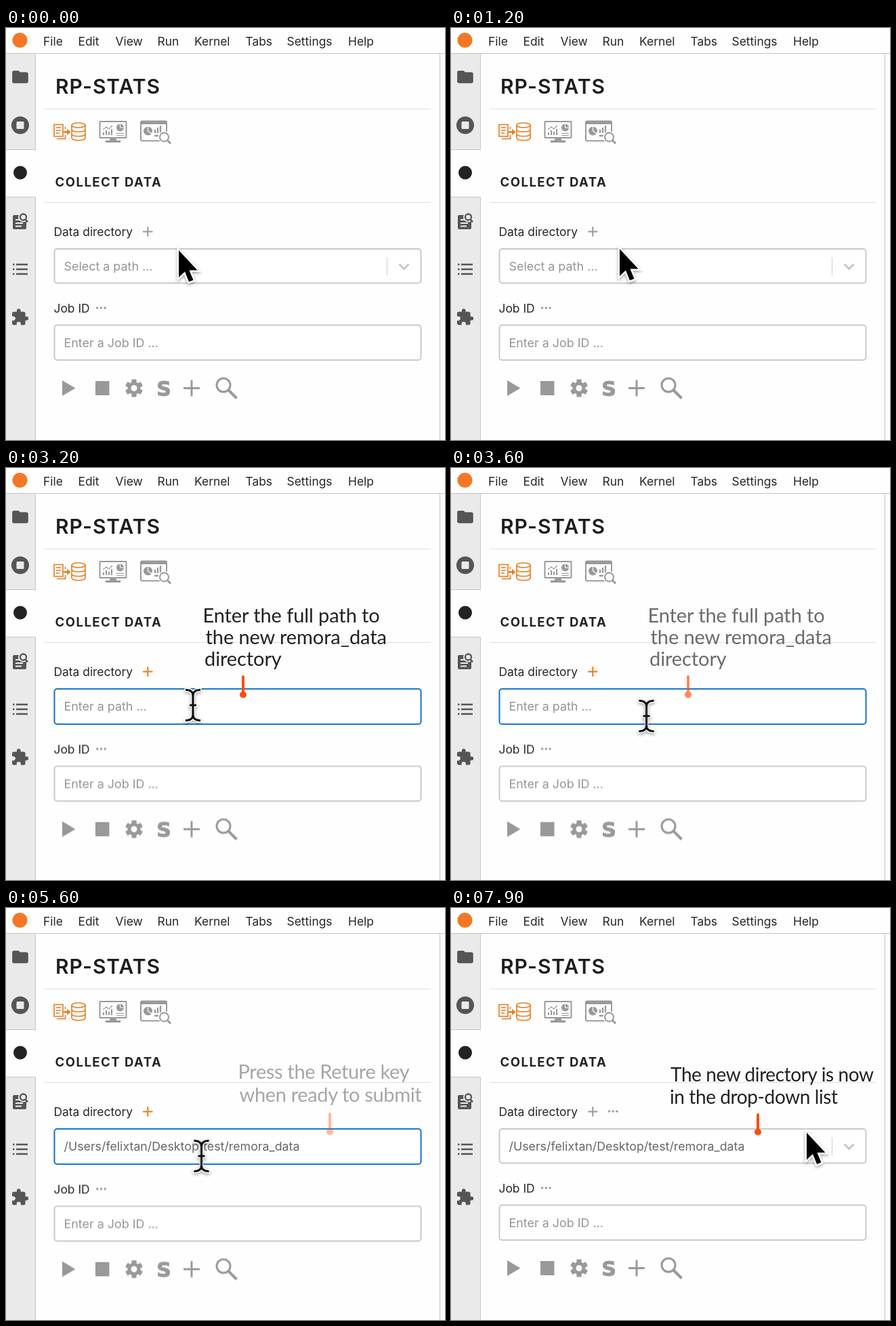
An HTML page that plays this animation: 648x608 px, repeating every 8 s.

```html
<!DOCTYPE html>
<html lang="en">
<head>
<meta charset="utf-8">
<title>Collect data</title>
<style>
html, body { margin: 0; width: 100%; height: 100%; overflow: hidden; background: #fefefe; }
svg { display: block; width: 648px; height: 608px; }
text { font-family: Inter, Roboto, sans-serif; font-optical-sizing: none; font-size: 17.4px; fill: #262626; white-space: pre; }
.hint { font-size: 17.9px; fill: #949494; }
.path { font-size: 17.8px; fill: #666; }
.note text { font: 29px Lato, "Open Sans", sans-serif; fill: #222; }
.note path { stroke: #ff4e0a; stroke-width: 4; stroke-linecap: round; }
.note circle { fill: #ff4e0a; }
.line { fill: none; stroke: #dedede; }
.edge { fill: none; stroke: #c4c4c4; }
.box { fill: #fff; stroke: #c9c9c9; stroke-width: 2; }
.dark { fill: #555; }
.gray { fill: #999; }
.stroke { fill: none; stroke: #999; stroke-width: 2; }
.orange { fill: none; stroke: #ec7a1c; stroke-width: 1.6; }

/* every part shares one 8 s clock */
.step { animation: 8s step-end infinite; }
.flow { animation: 8s linear infinite; }
.start { animation-name: start; }
.view { animation-name: view; }
.edit { animation-name: edit; }
.done { animation-name: done; }
.empty { animation-name: empty; }
.typed { animation-name: typed; }
.focus { animation-name: focus; stroke: #1976d2; }
.lower { animation-name: lower; }
.plus { animation-name: plus; fill: none; stroke: #999; stroke-width: 2; }
.arrow { animation-name: arrow; }
.hand { animation-name: hand; }
.beam { animation-name: beam; }
.note1 { animation-name: note1; letter-spacing: -.1px; }
.note2 { animation-name: note2; letter-spacing: -.35px; }
.note3 { animation-name: note3; letter-spacing: -.4px; }
.note3 text { font-size: 28px; }
.cursor { animation-name: travel; filter: drop-shadow(0 2px 2px rgba(0, 0, 0, .35)); }

@keyframes start { 0% { opacity: 1 } 23.75%, 100% { opacity: 0 } }
@keyframes view { 0% { opacity: 1 } 23.75% { opacity: 0 } 72.5%, 100% { opacity: 1 } }
@keyframes edit { 0% { opacity: 0 } 23.75% { opacity: 1 } 72.5%, 100% { opacity: 0 } }
@keyframes done { 0% { opacity: 0 } 72.5%, 100% { opacity: 1 } }
@keyframes empty { 0% { opacity: 0 } 23.75% { opacity: 1 } 47.5%, 100% { opacity: 0 } }
@keyframes typed { 0% { opacity: 0 } 47.5% { opacity: 1 } 72.5%, 100% { opacity: 0 } }
@keyframes focus { 0% { opacity: 0 } 33.75% { opacity: 1 } 72.5%, 100% { opacity: 0 } }
@keyframes lower { 0% { transform: none } 23.75% { transform: translateY(1.5px) } 72.5%, 100% { transform: none } }
@keyframes plus { 0% { stroke: #999 } 20% { stroke: #ec7a1c } 72.5%, 100% { stroke: #999 } }
@keyframes arrow { 0% { opacity: 1 } 18.75% { opacity: 0 } 72.5%, 100% { opacity: 1 } }
@keyframes hand { 0% { opacity: 0 } 18.75% { opacity: 1 } 29.375%, 100% { opacity: 0 } }
@keyframes beam { 0% { opacity: 0 } 29.375% { opacity: 1 } 72.5%, 100% { opacity: 0 } }
@keyframes note1 { 0%, 35% { opacity: 0 } 38.75%, 43.75% { opacity: 1 } 47.5%, 100% { opacity: 0 } }
@keyframes note2 { 0%, 53.75% { opacity: 0 } 58.75%, 67% { opacity: 1 } 72%, 100% { opacity: 0 } }
@keyframes note3 { 0%, 76.25% { opacity: 0 } 81.25%, 100% { opacity: 1 } }
@keyframes travel {
  0%, 11.25% { transform: translate(255px, 328px) }
  15% { transform: translate(249px, 326px) }
  20%, 23.75% { transform: translate(213px, 304px) }
  27.5% { transform: translate(235px, 317px) }
  31.25% { transform: translate(274px, 350px) }
  33.75%, 41.25% { transform: translate(276px, 350px) }
  43.75%, 73% { transform: translate(288.5px, 366px) }
  77.5%, 94.375% { transform: translate(582px, 332px) }
  98.75%, 100% { transform: translate(525px, 331.5px) }
}
</style>
</head>
<body>
<svg viewBox="0 0 648 608">
  <defs>
    <g id="dots" class="gray"><circle r="1.7"/><circle cx="5.7" r="1.7"/><circle cx="11.4" r="1.7"/></g>
    <path id="ibeam" d="M-9.5-22.5Q0-22 0-14Q0-22 9.5-22.5M0-14V14M-9.5 22.5Q0 22 0 14Q0 22 9.5 22.5M-3.5 0H3.5" fill="none" stroke-linecap="square"/>
    <rect id="tooth" x="-3.6" y="-13" width="7.2" height="26" rx="1"/>
  </defs>

  <!-- frame and menu -->
  <rect width="648" height="608" fill="#fefefe"/>
  <path d="M0 38H43V179H0ZM0 250H43V608H0Z" fill="#ebeaeb"/>
  <path class="edge" d="M0 37.5H648M43.5 38V179.5H0M0 249.5H43.5V608M640.5 38V608"/>
  <circle cx="20.5" cy="18" r="11" fill="#f37726"/>
  <g>
    <text x="55" y="25.5">File</text>
    <text x="106.5" y="25.5">Edit</text>
    <text x="161.5" y="25.5">View</text>
    <text x="223.5" y="25.5">Run</text>
    <text x="278" y="25.5">Kernel</text>
    <text x="353.5" y="25.5">Tabs</text>
    <text x="414.5" y="25.5">Settings</text>
    <text x="505" y="25.5">Help</text>
  </g>

  <!-- sidebar -->
  <path class="dark" transform="translate(6.8 58.4) scale(1.18 1.15)" d="M10 4H4c-1.1 0-2 .9-2 2v12c0 1.1.9 2 2 2h16c1.1 0 2-.9 2-2V8c0-1.1-.9-2-2-2h-8l-2-2z"/>
  <circle class="dark" cx="21" cy="143.5" r="13"/>
  <rect x="15.5" y="138" width="11" height="11" rx="1.5" fill="#ebeaeb"/>
  <circle cx="21" cy="213.5" r="10" fill="#222"/>
  <rect class="dark" x="10" y="276" width="20" height="21" rx="2"/>
  <path d="M14 283H20M14 288H25M14 292.5H23" stroke="#ebeaeb" stroke-width="2"/>
  <circle cx="25.5" cy="279" r="7.5" fill="#ebeaeb"/>
  <path d="M28.5 282L32 286.5" stroke="#555" stroke-width="2.5"/>
  <circle cx="25.5" cy="279" r="4.5" fill="none" stroke="#555" stroke-width="2.3"/>
  <path d="M10 349H12.5M10 356H12.5M10 363H12.5M15 349H32M15 356H32M15 363H32" stroke="#555" stroke-width="2.3"/>
  <path class="dark" transform="translate(6.7 413) scale(1.15)" d="M20.5 11H19V7c0-1.1-.9-2-2-2h-4V3.5C13 2.1 11.9 1 10.5 1S8 2.1 8 3.5V5H4c-1.1 0-2 .9-2 2v3.8h1.5a2.7 2.7 0 0 1 0 5.4H2V20c0 1.1.9 2 2 2h3.8v-1.5a2.7 2.7 0 0 1 5.4 0V22H17c1.1 0 2-.9 2-2v-4h1.5a2.5 2.5 0 0 0 0-5z"/>

  <!-- headings -->
  <text x="73" y="97" style="font-size:30px;font-weight:600;letter-spacing:1px;fill:#1e1e20">RP-STATS</text>
  <path class="line" d="M57 119.5H627M57 257.5H627"/>
  <text x="72.5" y="233.5" style="font-size:18.5px;font-weight:700;letter-spacing:1.5px;fill:#222">COLLECT DATA</text>

  <!-- section icons -->
  <g class="orange">
    <path d="M71 142.5H84V160H71ZM87.5 146V149M87.5 158V163.5H75M74 147H81M74 151H81M74 155H79"/>
    <path d="M85 153.5H91" stroke-width="2.5"/>
    <path d="M90 149L95.5 153.5L90 158Z" fill="#ec7a1c" stroke="none"/>
    <ellipse cx="107" cy="143.5" rx="10" ry="3.5"/>
    <path d="M97 143.5V162C97 167 117 167 117 162V143.5M97 149.5C97 154.5 117 154.5 117 149.5M97 156C97 161 117 161 117 156"/>
  </g>
  <rect class="stroke" x="138.5" y="138" width="39" height="24" rx="1"/>
  <path class="gray" d="M154 162H162L163.5 166H169V169H147V166H152.5Z"/>
  <path class="stroke" d="M144 158V154M148 158V151M152 158V153M156 158V149" stroke-width="2.5"/>
  <path class="stroke" d="M143 150L148 146L152 149L157 144M163 155.5H174M163 158.5H174" style="stroke-width:1.2"/>
  <circle class="gray" cx="168.5" cy="147" r="5.5"/>
  <path d="M168.5 147V141.5M168.5 147H174" stroke="#fefefe"/>
  <rect class="stroke" x="199" y="137.5" width="38" height="29" rx="2"/>
  <path class="gray" d="M199 137H237V142H199Z"/>
  <circle class="gray" cx="209.5" cy="152" r="6.5"/>
  <path d="M209.5 152V145.5M209.5 152L215 156" stroke="#fefefe" stroke-width="1.2"/>
  <path class="stroke" d="M220 155V150M224 155V147M228 155V144M219 159H226" style="stroke-width:2.3"/>
  <circle cx="233.5" cy="161" r="9" fill="#fefefe"/>
  <circle class="stroke" cx="233.5" cy="161" r="6.5"/>
  <path class="stroke" d="M238.5 166L243 170.5" style="stroke-width:3"/>

  <!-- directory field -->
  <text x="70.5" y="307">Data directory</text>
  <path class="step plus" d="M202 300.5H216.500M209.300 293.200V307.800"/>
  <use href="#dots" x="233.5" y="300" class="step done"/>
  <g class="step view">
    <rect class="box" x="71.5" y="326" width="541" height="50.5" rx="4"/>
    <path d="M562.5 338V365" stroke="#ccc"/>
    <path d="M580.5 348.5L587.5 355.5L594.5 348.5" fill="none" stroke="#c6c6c6" stroke-width="3"/>
  </g>
  <text class="hint step start" x="85.5" y="358">Select a path ...</text>
  <g class="step edit">
    <rect class="box" x="71.5" y="326" width="541" height="52" rx="4"/>
  </g>
  <rect class="box step focus" x="71.5" y="326" width="541" height="52" rx="4"/>
  <text class="hint step empty" x="85.5" y="358">Enter a path ...</text>
  <text class="path step typed" x="85.5" y="358">/Users/felixtan/Desktop/test/remora_data</text>
  <text class="path step done" x="85.5" y="358">/Users/felixtan/Desktop/test/remora_data</text>

  <!-- job field and tools -->
  <g class="step lower">
    <text x="70.5" y="420">Job ID</text>
    <use href="#dots" x="134.7" y="413"/>
    <rect class="box" x="71.5" y="438.5" width="541" height="51.5" rx="4"/>
    <text class="hint" x="85.5" y="471">Enter a Job ID ...</text>
    <path class="gray" d="M83 520L102.5 531.5L83 543Z"/>
    <rect class="gray" x="132" y="521" width="20.5" height="21"/>
    <g class="gray" transform="translate(189 531.5)">
      <circle r="9.5"/>
      <use href="#tooth"/><use href="#tooth" transform="rotate(60)"/><use href="#tooth" transform="rotate(120)"/>
      <circle r="4.5" fill="#fefefe"/>
    </g>
    <text x="233" y="542.5" text-anchor="middle" stroke="#999" style="font:bold 30px 'DejaVu Sans',sans-serif;fill:#999">S</text>
    <path class="stroke" d="M262 531.5H286M274 519.5V543.5" style="stroke-width:3"/>
    <circle class="stroke" cx="321" cy="527" r="10" style="stroke-width:3"/>
    <path class="stroke" d="M328 534L340.5 546.5" style="stroke-width:4"/>
  </g>

  <!-- callouts -->
  <g class="note flow note1">
    <text x="290.5" y="228">Enter the full path to</text>
    <text x="294.5" y="260">the new remora_data</text>
    <text x="293" y="292">directory</text>
    <path d="M350 308V332"/><circle cx="350" cy="334.5" r="5"/>
  </g>
  <g class="note flow note2">
    <text x="342.5" y="252">Press the Reture key</text>
    <text x="344.5" y="286">when ready to submit</text>
    <path d="M478 304V328"/><circle cx="478" cy="330" r="5"/>
  </g>
  <g class="note flow note3">
    <text x="324" y="256">The new directory is now</text>
    <text x="323" y="288.5">in the drop-down list</text>
    <path d="M453 305V328"/><circle cx="453" cy="330.5" r="5"/>
  </g>

  <!-- pointer -->
  <g class="flow cursor">
    <path class="step arrow" d="M0 0V40L9 31.5L15 46.5L21.5 44L15.5 29.5H27.5Z" stroke="#fff" stroke-width="5" paint-order="stroke"/>
    <g class="step hand" stroke="#111" stroke-width="2.8" stroke-linejoin="round" stroke-linecap="round">
      <path fill="#fff" d="M-5 3C-6-3 1-4 3 1L8 14C10 11 15 11 17 14C19 12 23 12 24 15C27 14 30 15 31 19C32 26 30 32 27 37V45H6L5 40C0 37-5 31-12 27C-15 24-12 19-7 21L2 25Z"/>
      <path d="M9 24L9.5 35M15 24L15.5 35M21 24V35"/>
    </g>
    <g class="step beam">
      <use href="#ibeam" stroke="#fff" stroke-width="6"/>
      <use href="#ibeam" stroke="#111" stroke-width="3.2"/>
    </g>
  </g>
</svg>
</body>
</html>
```
